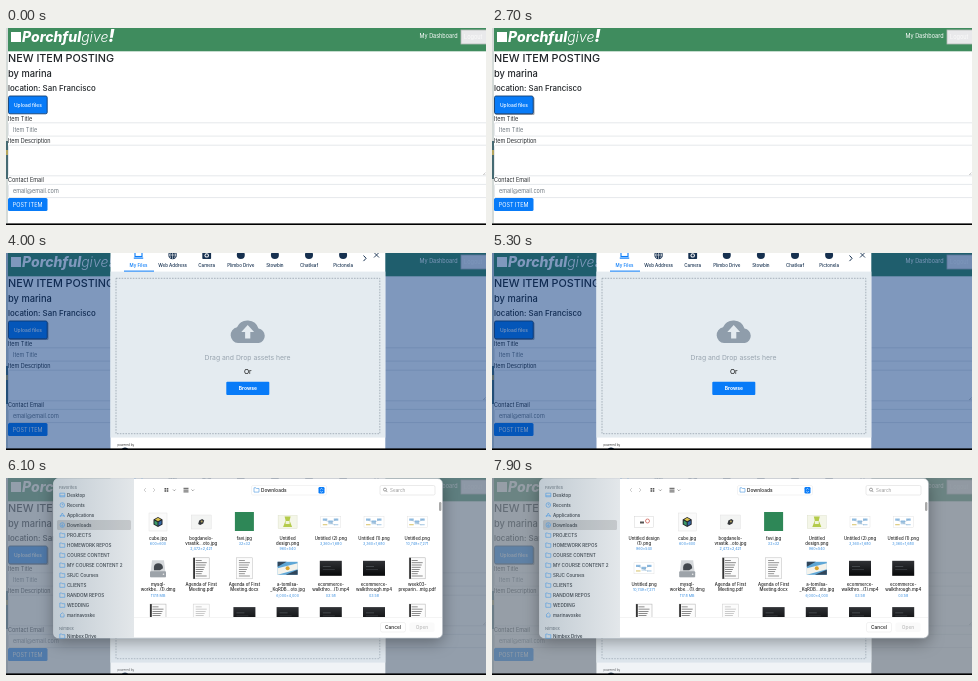
Recreate the animation shown at these times as an HTML page. Size 480 px wide and 197 px high, loop 8 s.

```html
<!DOCTYPE html>
<html lang="en">
<head>
<meta charset="utf-8">
<style>
html, body { margin: 0; width: 100%; height: 100%; overflow: hidden; background: #fff; }
svg { display: block; width: 100%; height: 100%; font-family: Inter, Roboto, sans-serif; }
</style>
</head>
<body>
<svg id="stage" viewBox="0 0 480 197"></svg>
<script>
const LOOP = 8000, HOVER = 2500, PICKER = 2800, SHEET = 5900, SHEET_TIME = 200, SETTLE_TIME = 300, NEW_FILE = 7100;
const BLUE = '#087bf8', FOLDER = '#4b97df';

const attrs = o => Object.entries(o).map(([k, v]) => ` ${k}="${v}"`).join('');
const rect = (x, y, w, h, fill, more = {}) =>
  `<rect${attrs({ x, y, width: w, height: h, fill, ...more })}/>`;
const circle = (cx, cy, r, fill, more = {}) => `<circle${attrs({ cx, cy, r, fill, ...more })}/>`;
const path = (d, fill, more = {}) => `<path${attrs({ d, fill, ...more })}/>`;
const line = (d, stroke, width = .7) => path(d, 'none', { stroke, 'stroke-width': width });
const text = (x, y, size, fill, str, more = {}) =>
  `<text${attrs({ x, y, 'font-size': size, fill, ...more })}>${str}</text>`;
const mid = (x, y, size, fill, str, more = {}) =>
  text(x, y, size, fill, str, { 'text-anchor': 'middle', ...more });
const group = (id, body, more = {}) => `<g${attrs({ id, ...more })}>${body}</g>`;
const medium = { 'font-weight': 500 };

function formPage() {
  const ink = '#212529', hint = '#6c757d';
  const field = (y, h) => rect(2.5, y, 480, h, '#fff', { stroke: '#d3d8dd', 'stroke-width': .6, rx: 1.3 });
  return rect(0, 0, 480, 197, '#fff') +
    rect(0, 0, 480, 23.3, '#3f8c5e') +
    rect(5, 4, 10, 10, '#fff') +
    `<text x="16" y="14" font-size="14" fill="#fff" font-style="italic">` +
    `<tspan font-weight="800">Porchful</tspan><tspan font-weight="300">give</tspan>` +
    `<tspan font-weight="800" font-size="18">!</tspan></text>` +
    text(413.5, 10.3, 5.5, '#fff', 'My Dashboard') +
    rect(455, 2, 26, 14, '#e9e9eb', { stroke: '#b5b8b6', 'stroke-width': .8 }) +
    text(458, 11.2, 5.6, '#fbfbfb', 'Logout') +
    text(2, 34.3, 10.8, ink, 'NEW ITEM POSTING', medium) +
    text(2, 49.3, 9.3, ink, 'by marina', medium) +
    text(2, 62.8, 7.9, ink, 'location: San Francisco', medium) +
    group('hover', rect(3.2, 69, 39.3, 18, '#4c5563', { rx: 1.5, opacity: .55 })) +
    rect(2.5, 68, 38.7, 17.8, BLUE, { rx: 1.5, stroke: '#163f70', 'stroke-width': .9 }) +
    text(8, 78.7, 4.9, '#fff', 'Upload files', medium) +
    text(2, 92.6, 5.5, ink, 'Item Title') + field(94.8, 13.3) +
    text(7, 103.6, 5.5, hint, 'Item Title') +
    text(2, 114.6, 5.5, ink, 'Item Description') + field(117.2, 30.6) +
    line('M477 147l2.5-2.5M478.4 147l1.1-1.1', '#888', .4) +
    text(2, 154, 5.5, ink, 'Contact Email') + field(156.4, 13.2) +
    text(7, 165, 5.5, hint, 'email@email.com') +
    rect(2, 170, 39.5, 13, BLUE, { rx: 1.5 }) +
    text(6.8, 178.6, 5.5, '#fff', 'POST ITEM') +
    rect(0, 0, 2, 195, '#d4dad8') + rect(0, 113, 2, 38, '#456a72') + rect(0, 122, 2, 5, '#b3a45c');
}

function picker() {
  const ink = '#16304f';
  const tabs = ['My Files', 'Web Address', 'Camera', 'Plimbo Drive', 'Stowbin', 'Chatleaf', 'Pictonela'];
  const icons = [
    x => rect(x - 3.5, -3, 7, 6.5, 'none', { stroke: BLUE, 'stroke-width': 1.1 }) + rect(x - 4.7, 4.5, 9.4, 1.2, BLUE),
    x => circle(x, 2, 4.3, ink) + line(`M${x - 4} 2h8M${x} -2v8M${x - 2} -1q-2 3 0 6M${x + 2} -1q2 3 0 6`, '#fff', .6),
    x => rect(x - 4.4, -1, 8.8, 7, ink, { rx: .8 }) + rect(x - 2, -2.4, 4, 2, ink) + circle(x, 2.4, 2.2, '#fff') + circle(x, 2.4, 1.2, ink),
    ...Array(4).fill(x => circle(x, 2, 4, ink))
  ];
  return rect(0, 0, 480, 197, 'rgb(0,50,125)', { opacity: .5 }) +
    group('pageWash', rect(0, 0, 480, 197, '#aaa496')) +
    rect(104.5, -5, 274.8, 202, '#fff') +
    tabs.map((name, i) => {
      const x = 132.5 + 34.1 * i;
      return icons[i](x) + mid(x, 13.6, 4.5, i ? ink : BLUE, name, medium);
    }).join('') +
    line('M357.5 2.5l2.6 2.8l-2.6 2.8', ink, 1) + line('M368 -.5l5 5M373 -.5l-5 5', ink, .9) +
    rect(104.5, 18.6, 274.8, 166, '#e4ebf0') + rect(118, 17.6, 30, 1, BLUE) +
    rect(110, 25.3, 263.8, 155.4, 'none', { stroke: '#8d99a5', 'stroke-width': .7, 'stroke-dasharray': '1.6 1.2' }) +
    path('M232 90a8 8 0 0 1-1-15.8a11.5 11.5 0 0 1 21.5 1.4a7.3 7.3 0 0 1 .3 14.4z', '#8f9dab') +
    path('M241.7 72l6.4 7h-3.8v6.5h-5.2v-6.5h-3.8z', '#e4ebf0') +
    mid(241.5, 107.3, 6.8, '#98a4af', 'Drag and Drop assets here') +
    mid(241.8, 121.3, 6.8, '#111', 'Or') +
    rect(220.3, 128.8, 43, 13.3, BLUE, { rx: 1 }) +
    mid(241.8, 137.3, 5, '#fff', 'Browse', { 'font-weight': 700 }) +
    text(111.5, 193, 3, '#333', 'powered by') + circle(119, 198, 3.6, ink) +
    group('panelWash', rect(104.5, -5, 274.8, 202, '#c3ced9'));
}

// Thumbnails are drawn around 0,0.
const sheetOfPaper = (ink, edge) => rect(-8, -10.5, 16, 21, '#fcfcfc', { stroke: edge, 'stroke-width': .5 }) +
  Array.from({ length: 8 }, (_, i) => rect(-5.5, -8 + i * 2.2, 6 + i * 5 % 6, .6, ink)).join('');
const thumbs = {
  cube: () => rect(-9, -9, 18, 18, '#fafafa', { stroke: '#ddd', 'stroke-width': .4 }) +
    path('M0-5l4.5 2.5v5l-4.5 2.5l-4.5-2.5v-5z', '#20242b') + path('M0-4.2l3 1.7L0-.8l-3-1.7z', '#d8c04a') +
    path('M-3.5-1.5l3 1.7v3.5l-3-1.7z', '#3c9b68') + path('M3.5-1.5l-3 1.7v3.5l3-1.7z', '#3569a8'),
  photo: () => rect(-10, -7, 20, 14, '#f3f4f3', { stroke: '#ddd', 'stroke-width': .4 }) +
    path('M-3 2l1-3.5l3-1.5l2 1.5l-1 3l-3 1.5z', '#34373a') + circle(.5, -.5, 1, '#b3a25d'),
  favi: () => rect(-9.5, -10, 19, 19, '#2e8757'),
  design: () => rect(-9.5, -6.5, 19, 13, '#f4f6e8', { stroke: '#d8dcc4', 'stroke-width': .4 }) +
    path('M-3-5.5h6l-1 4l2.5 6.5h-9l2.5-6.5z', '#b4cb4b') + rect(-2, -1, 4, 3, '#f0f4d8'),
  notice: () => rect(-9.5, -5.5, 19, 11, '#fff', { stroke: '#ccc', 'stroke-width': .4 }) +
    rect(-4, -.5, 4, 2, '#555') + circle(3.5, -1, 2, 'none', { stroke: '#d0645c', 'stroke-width': .8 }),
  chart: () => rect(-10, -5.5, 20, 11, '#fff', { stroke: '#ddd', 'stroke-width': .4 }) +
    [-8, -2.5, 3].map((x, i) => rect(x, -3.5 + i % 2 * 2, 4.5, 2.2, '#8fbbe0') + rect(x, 2 - i % 2, 4.5, 1.3, i ? '#b9d4ea' : '#e0cf88')).join('') +
    line('M-6 -2L4 3M0 1L6 -3', '#7b9ab5', .3),
  disk: () => path('M-8 9l2-17h12l2 17z', '#d5d8db') + rect(-8, 3, 16, 6, '#9da3a9', { rx: 1 }) +
    path('M-4 2q-1-7 4-7t5 5l-3 2z', '#43484e') + circle(5.5, 6, .8, '#eee'),
  doc: () => sheetOfPaper('#555', '#bbb'),
  bound: () => sheetOfPaper('#444', '#aaa') + rect(-8, -10.5, 1.8, 21, '#333'),
  pale: () => sheetOfPaper('#aaa', '#ccc'),
  flag: () => rect(-10, -6.5, 20, 13, '#5fa7d6') + path('M-10-6.5h9l-9 5z', '#31465a') +
    path('M-10 0l20-5v6l-20 5.5z', '#f4f3ec') + circle(0, 0, 2, '#d7a531') + path('M-2 6.5l12-5v5z', '#31465a'),
  video: () => rect(-11, -7.5, 22, 15, 'url(#screen)') + rect(-8, -2, 8, .6, '#5b6065') + rect(-8, 1, 12, .6, '#44484d')
};

const NEWEST = ['notice', 'Untitled design', '(1).png', '960×540'];
const FILES = [
  ['cube', 'cube.jpg', '', '600×600'],
  ['photo', 'bogdanelo-', 'vrastik...oto.jpg', '2,472×2,421'],
  ['favi', 'favi.jpg', '', '32×32'],
  ['design', 'Untitled', 'design.png', '960×540'],
  ['chart', 'Untitled (2).png', '', '3,360×1,680'],
  ['chart', 'Untitled (1).png', '', '3,360×1,680'],
  ['chart', 'Untitled.png', '', '10,749×7,271'],
  ['disk', 'mysql-', 'workbe...(1).dmg', '117.8 MB'],
  ['bound', 'Agenda of First', 'Meeting.pdf', ''],
  ['doc', 'Agenda of First', 'Meeting.docx', ''],
  ['flag', 'a-tomilsa-', '_KqRDB...oto.jpg', '6,000×4,000'],
  ['video', 'ecommerce-', 'walkthro...(1).mp4', '03:58'],
  ['video', 'ecommerce-', 'walkthrough.mp4', '03:58'],
  ['bound', 'week03-', 'preparin...mtg.pdf', ''],
  ...['bound', 'pale', 'video', 'video', 'video', 'video', 'bound'].map(kind => [kind, '', '', ''])
];

const fileGrid = files => files.slice(0, 21).map(([kind, first, second, info], i) => {
  const x = 152 + 43.2 * (i % 7), y = 44 + 46.3 * Math.floor(i / 7);
  return `<g transform="translate(${x} ${y})">${thumbs[kind]()}` +
    mid(0, 17.6, 4.3, '#222', first, medium) + mid(0, 23.1, 4.3, '#222', second, medium) +
    mid(0, second ? 28.3 : 22.6, 3.7, '#3b8fe0', info) + '</g>';
}).join('');

function fileSheet() {
  const places = ['Desktop', 'Recents', 'Applications', 'Downloads', 'PROJECTS', 'HOMEWORK REPOS', 'COURSE CONTENT',
    'MY COURSE CONTENT 2', 'SRJC Courses', 'CLIENTS', 'RANDOM REPOS', 'WEDDING', 'marinavoske'];
  const ring = 'M-2.3 0a2.3 2.3 0 1 0 4.6 0a2.3 2.3 0 1 0-4.6 0';
  const shapes = {
    Desktop: 'M-2.5-1.8h5v3.6h-5zM-2.5 .8h5',
    Recents: ring + 'M0-1.4v1.4h1.2',
    Applications: 'M-2.2 2L0-2L2.2 2M-2.5 .8h5',
    Downloads: ring + 'M0-1.3v2.6M-1 .3l1 1l1-1',
    marinavoske: 'M-2.4 0l2.4-2.2l2.4 2.2M-1.7 0v2h3.4v-2',
    folder: 'M-2.5-2h1.9l.6.7h2.5v3.6h-5z'
  };
  const icon = (name, x, y) => `<g transform="translate(${x} ${y})">${line(shapes[name] || shapes.folder, FOLDER, .6)}</g>`;
  const place = (name, y) => icon(name, 56.3, y) + text(61, y + 1.7, 4.6, '#3a444d', name, medium);
  const chevron = (x, y) => line(`M${x} ${y}l1.3 1.3l1.3-1.3`, '#666', .6);
  return rect(47.5, .5, 389, 159.5, '#fff', { rx: 5, stroke: '#aab1b8', 'stroke-width': .5, filter: 'url(#shadow)' }) +
    path('M128 .5H52.5a5 5 0 0 0-5 5V155a5 5 0 0 0 5 5H128z', 'url(#glass)') +
    rect(51, 42, 74, 10, '#000', { rx: 1.5, opacity: .13 }) +
    text(53, 10.8, 4.1, '#74808b', 'Favorites', medium) +
    places.map((name, i) => place(name, 17 + 10 * i)).join('') +
    text(53, 152, 4.1, '#74808b', 'Nimbex', medium) + place('Nimbex Drive', 158) +
    line('M140 10l-2 2l2 2M147 10l2 2l-2 2', '#bbb', .7) +
    [0, 2.2].map(dx => [0, 2.2].map(dy => rect(158.5 + dx, 10 + dy, 1.6, 1.6, '#555')).join('')).join('') + chevron(167, 11.5) +
    [0, 1.8, 3.6].map(dy => rect(177.5, 9.8 + dy, 5, 1, '#555')).join('') + chevron(185.5, 11.5) +
    rect(245.5, 7.5, 75, 9.5, '#fff', { rx: 1.5, stroke: '#e6e6e6', 'stroke-width': .5 }) +
    icon('folder', 250.5, 11.8) + text(255, 13.8, 4.8, '#222', 'Downloads', medium) +
    rect(312.5, 9, 6, 6.5, BLUE, { rx: 1.3 }) +
    line('M314.2 11.6l1.3-1.3l1.3 1.3M314.2 13l1.3 1.3l1.3-1.3', '#fff', .6) +
    rect(374, 7.5, 55, 9.5, '#fff', { rx: 1.5, stroke: '#d5d5d5', 'stroke-width': .5 }) +
    circle(379, 11.6, 1.5, 'none', { stroke: '#666', 'stroke-width': .6 }) + line('M380 12.7l1.4 1.4', '#666', .6) +
    text(384, 13.8, 4.6, '#999', 'Search') +
    rect(433, 24, 2.4, 9, '#a9a9a9', { rx: 1.2 }) +
    group('before', fileGrid(FILES), { 'clip-path': 'url(#list)' }) +
    group('after', fileGrid([NEWEST, ...FILES]), { 'clip-path': 'url(#list)' }) +
    rect(128, 139, 308, .5, '#e8e8e8') +
    rect(374.5, 144.5, 25, 9.5, '#fff', { rx: 1.7, stroke: '#e4e4e4', 'stroke-width': .5 }) +
    mid(387, 151, 4.8, '#222', 'Cancel', medium) +
    rect(403.5, 144.5, 25, 9.5, '#fafafa', { rx: 1.7 }) + mid(416, 151, 4.8, '#bbb', 'Open', medium);
}

const gradient = (id, from, to, more = {}) =>
  `<linearGradient${attrs({ id, ...more })}><stop stop-color="${from}"/><stop offset="1" stop-color="${to}"/></linearGradient>`;

const $ = id => document.getElementById(id);
$('stage').innerHTML =
  `<defs><clipPath id="list">${rect(128, 22, 305, 117, '#000')}</clipPath>` +
  gradient('glass', '#c0cad2', '#e3e7ea') + gradient('screen', '#303236', '#08090a', { x2: 0, y2: 1 }) +
  `<filter id="shadow" x="-15%" y="-15%" width="130%" height="140%"><feDropShadow dx="0" dy="4" stdDeviation="8" flood-opacity=".35"/></filter></defs>` +
  formPage() + group('picker', picker()) +
  rect(0, 195.4, 480, 1.6, '#000') + group('sheet', fileSheet());

const show = (id, on) => $(id).setAttribute('visibility', on ? 'visible' : 'hidden');
const progress = (t, start, length) => Math.min(1, Math.max(0, (t - start) / length));

function draw(now) {
  const t = now % LOOP;
  const p = progress(t, SHEET, SHEET_TIME);
  const settle = progress(t, SHEET + SHEET_TIME, SETTLE_TIME);
  show('hover', t >= HOVER);
  show('picker', t >= PICKER);
  show('before', t < NEW_FILE);
  show('after', t >= NEW_FILE);
  $('pageWash').setAttribute('opacity', .45 * p + .1 * settle);
  $('panelWash').setAttribute('opacity', .25 * p);
  $('sheet').setAttribute('opacity', p ** 1.3);
  $('sheet').setAttribute('transform', `translate(0 ${-20 * (1 - p)})`);
  requestAnimationFrame(draw);
}
draw(performance.now());
</script>
</body>
</html>
```
